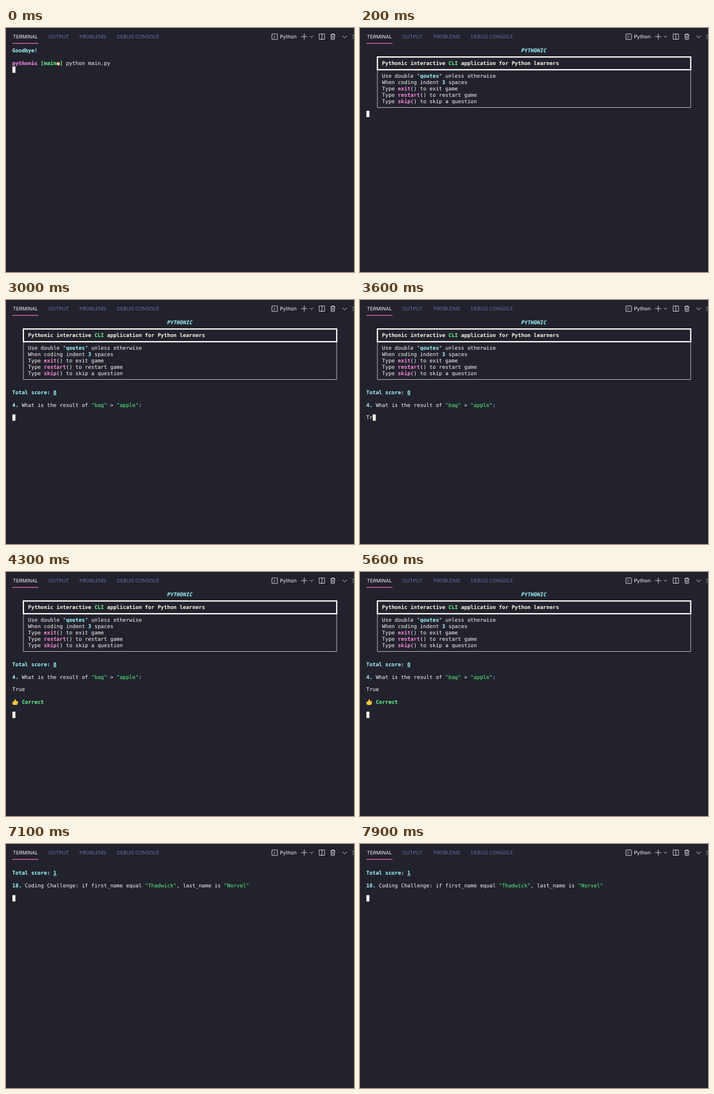
An HTML page for the animation above (8 s loop, 600 px wide and 422 px high).

```html
<!DOCTYPE html>
<html lang="en">
<head>
<meta charset="utf-8">
<title>Terminal quiz</title>
<style>
  html, body { margin: 0; width: 100%; height: 100%; overflow: hidden; background: #22222d; }
  svg { display: block; width: 600px; height: 422px; }
  text { white-space: pre; text-rendering: geometricPrecision; fill: #f8f8f2; }
  #screen text { font: 9.06px "DejaVu Sans Mono", monospace; }
  .tab { font: 8.5px Inter, sans-serif; fill: #6272a4; }
  .tab.on { fill: #f8f8f2; }
  .shell { font: 8.7px Inter, sans-serif; }
  .icons { fill: none; stroke: #e4e4e2; stroke-width: .9; }
  .b { font-weight: bold; }
  .i { font-style: italic; }
  .u { text-decoration: underline; }
  .cyan { fill: #a0ffff; }
  .pink { fill: #ff84d8; }
  .green { fill: #50fa7b; }
  .lime { fill: #69ff94; }
</style>
</head>
<body>
<svg viewBox="0 0 600 422">
  <rect width="600" height="422" fill="#22222d"/>
  <text class="tab on" x="12" y="18.1">TERMINAL</text>
  <text class="tab" x="73" y="18.1">OUTPUT</text>
  <text class="tab" x="126.8" y="18.1">PROBLEMS</text>
  <text class="tab" x="191" y="18.1">DEBUG CONSOLE</text>
  <rect x="11" y="26" width="45" height="1.1" fill="#ff79c6"/>
  <text class="shell" x="472.3" y="18.2">Python</text>
  <g class="icons">
    <rect x="458.4" y="10.2" width="9.6" height="9.6" rx=".6"/>
    <path d="M461.2 12.6l2.6 2.5l-2.6 2.5"/>
    <path d="M509 14.9h10.4M514.2 9.7v10.4M524 13.7l2.7 2.6l2.7-2.6"/>
    <path d="M540 10.3h9.2v9.2h-9.2zM544.6 10.3v9.2"/>
    <path d="M559.2 11.6h8.6M562 11.6v-1.5h3v1.5M560.3 11.6l.4 8h5.6l.4-8M562.4 13.5v4.4M564.6 13.5v4.4"/>
    <path d="M580 13.3l3.9 3.8l3.9-3.8M597 11.4l7.2 7.2M597 18.6l7.2-7.2"/>
  </g>
  <g id="screen"></g>
</svg>
<script>
const LOOP = 8000, LEFT = 10.8, CELL = 5.454, ROW = 10.94, FIRST_ROW = 39.3;
const screen = document.getElementById("screen");

const rowY = row => FIRST_ROW + row * ROW;
const span = (style, text) => `<tspan class="${style}">${text}</tspan>`;
const line = (row, content, col = 0) =>
  `<text x="${LEFT + col * CELL}" y="${rowY(row) + 3}">${content}</text>`;
const cursor = (row, col = 0) =>
  `<rect x="${LEFT + col * CELL + .2}" y="${rowY(row) - 5.6}" width="5.3" height="11" fill="#f4f4ef"/>`;
const score = (row, points) =>
  line(row, span("b cyan", "Total score: ") + span("b cyan u", points));
const command = (row, name, effect) =>
  line(row, `Type ${span("b pink", name)}() to ${effect}`, 5);

const prompt =
  line(0, span("b cyan", "Goodbye!")) +
  line(2, `${span("b pink", "pythonic")} ${span("b lime", "[main ]")} python main.py`) +
  `<path d="M11 61.9h43.5" stroke="#a98bd6" stroke-width=".9" opacity=".75"/>` +
  `<circle cx="90" cy="61.8" r="2.9" fill="#f6c578"/>` +
  cursor(3);

const intro =
  line(0, span("b i cyan", "PYTHONIC"), 49) +
  `<g fill="none" stroke="#f8f8f2">
     <path d="M30 72V137.5H570.2V72" stroke="#c8c8c8" stroke-width=".9"/>
     <path d="M30 50.2H570.2V72.1H30Z" stroke-width="2.2"/>
   </g>` +
  line(2, span("b", `Pythonic interactive ${span("lime", "CLI")} application for Python learners`), 5) +
  line(4, `Use double "${span("b cyan", "qoutes")}" unless otherwise`, 5) +
  line(5, `When coding indent ${span("b cyan", "3")} spaces`, 5) +
  command(6, "exit", "exit game") +
  command(7, "restart", "restart game") +
  command(8, "skip", "skip a question");

const question = intro + score(11, 0) +
  line(13, `${span("b cyan", "4.")} What is the result of ${span("green", '"bag"')} &gt; ${span("green", '"apple"')}:`);

const typed = answer => question + line(15, answer) + cursor(15, answer.length);

const thumb =
  `<path d="M11.2 224.6L13.2 224Q15.3 222.5 15.2 220.2Q17.4 219.4 17.1 223.2L20 223.3
   Q21.2 224.2 20.5 225.4Q21 226.6 20.2 227.3Q20.4 228.6 19.4 228.9Q19 230.2 17.6 230.1
   L14.5 230Q12.6 229.4 11.2 229.3Z" fill="#f8c744"/>
   <path d="M17 225.2h3.3M17 227h3M17 228.7h2.3" stroke="#d58f25" stroke-width=".5"/>`;

const correct = question + line(15, "True") + thumb +
  line(17, span("b lime", "Correct"), 3) + cursor(19);

const challenge = score(1, 1) +
  line(3, `${span("b cyan", "18.")} Coding Challenge: if first_name equal ${span("green", '"Thadwick"')}, last_name is ${span("green", '"Norvel"')}`) +
  cursor(5);

const timeline = [
  [0, prompt],
  [100, intro + cursor(10)],
  [1800, typed("")],
  [3100, typed("T")],
  [3600, typed("Tr")],
  [3700, typed("Tru")],
  [3900, typed("True")],
  [4300, correct],
  [7100, challenge]
];

const start = performance.now();
let shown;
function draw() {
  const time = (performance.now() - start) % LOOP;
  const [, content] = timeline.findLast(([from]) => from <= time);
  if (content !== shown) screen.innerHTML = shown = content;
  requestAnimationFrame(draw);
}
draw();
</script>
</body>
</html>
```
